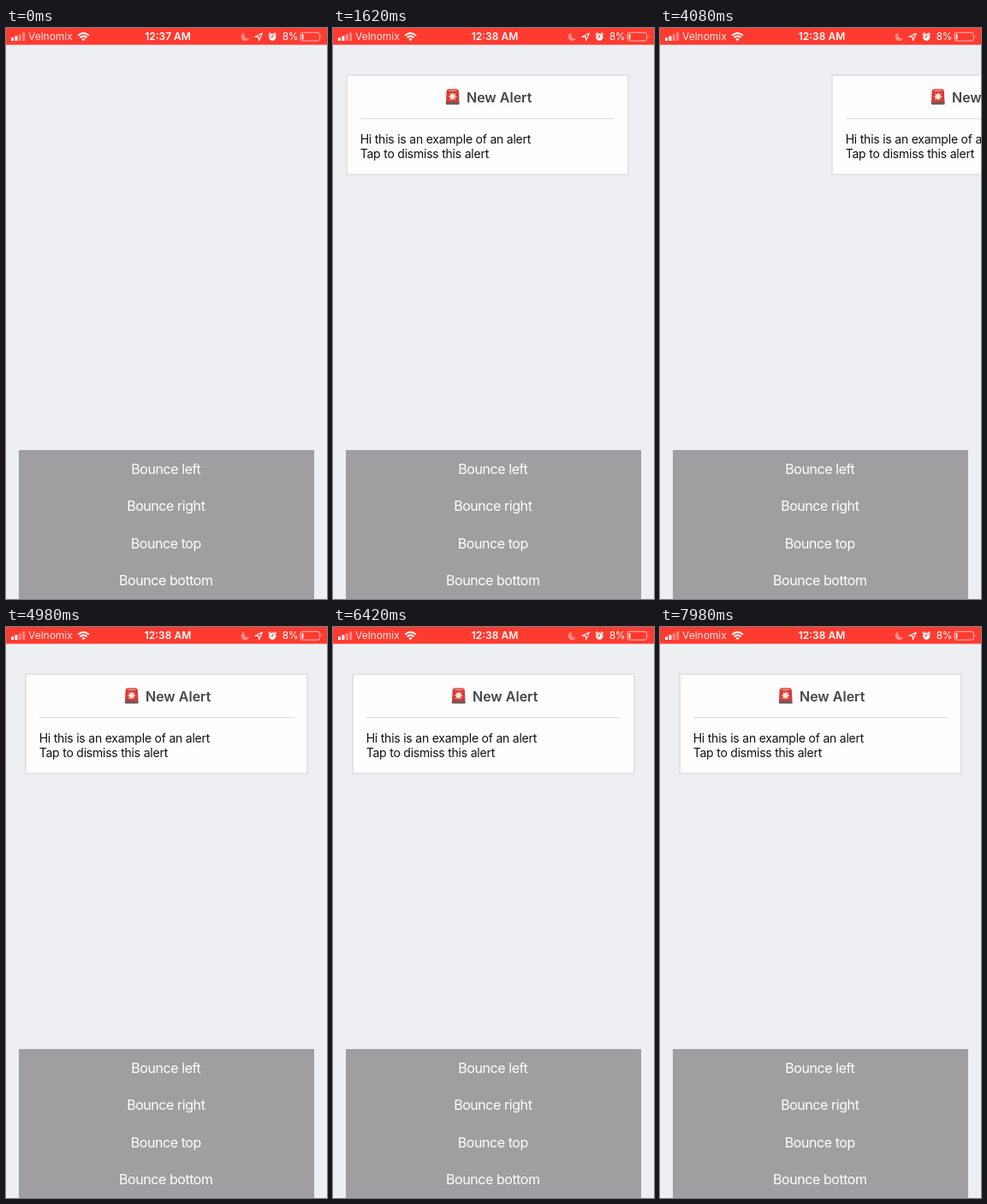
Recreate the animation shown at these times as an HTML page. Size 375 by 667 pixels, loop 8 s.

```html
<!DOCTYPE html>
<html lang="en">
<head>
<meta charset="utf-8">
<title>Bouncing alert</title>
<style>
  html, body { margin: 0; width: 100%; height: 100%; overflow: hidden; background: #edeff3; }
  svg { display: block; width: 100%; height: 100%; }
  text { font-family: Inter, Roboto, sans-serif; }
  .status { font-size: 12px; fill: #fff; }
  .buttons { font-size: 16px; letter-spacing: -.027em; fill: #fff; text-anchor: middle; }
  .title { font-size: 16px; font-weight: 600; fill: #464648; }
  .message { font-size: 14px; letter-spacing: -.016em; fill: #111; }
</style>
</head>
<body>
<svg viewBox="0 0 375 667">
  <rect width="375" height="667" fill="#edeff3"/>

  <rect x="15" y="493" width="345" height="174" fill="#a09ea0"/>
  <g class="buttons">
    <text x="186.8" y="520.5">Bounce left</text>
    <text x="186.8" y="564">Bounce right</text>
    <text x="186.8" y="607.5">Bounce top</text>
    <text x="186.8" y="651">Bounce bottom</text>
  </g>

  <g id="card" visibility="hidden">
    <rect x="23" y="55" width="329" height="116.3" fill="#fefefe" stroke="#e2e3e8" stroke-width="2"/>
    <g id="siren">
      <path d="M139 87 L139.6 74 Q140 71.3 143 71.3 H150.5 Q153.5 71.3 153.9 74 L154.5 87 Z" fill="#d93a34"/>
      <path d="M141.5 74 Q142 72.3 144 72.3 H149.5 Q151.5 72.3 152 74 Z" fill="#ee8a80"/>
      <path d="M146.8 74.5 L147.7 77.6 L150.7 76.2 L149.3 79 L152 80.3 L149 81.2 L150.3 84 L147.5 82.6 L146.4 85 L145.5 82.4 L142.7 83.7 L144.2 81 L141.5 79.8 L144.4 78.9 L143.2 76.2 L145.9 77.5 Z" fill="#ffe3dc"/>
      <rect x="138.8" y="86.3" width="15.9" height="3.2" rx="1.3" fill="#6d5a5e"/>
    </g>
    <text class="title" x="163" y="86.5">New Alert</text>
    <path d="M39 105.7 H336" stroke="#e4e5e9" stroke-width="1.6"/>
    <text class="message" x="38.7" y="135">Hi this is an example of an alert</text>
    <text class="message" x="38.7" y="152">Tap to dismiss this alert</text>
  </g>

  <rect width="375" height="19.6" fill="#ff3b30"/>
  <g class="status">
    <path d="M6 11.2h3v3.8h-3z M10.4 9.3h3v5.7h-3z" fill="#fff"/>
    <path d="M14.8 7.3h3v7.7h-3z M19.2 5.3h3v9.7h-3z" fill="#fff" opacity=".4"/>
    <text x="26" y="14.4" opacity=".88">Velnomix</text>
    <g fill="none" stroke="#fff" stroke-width="1.9">
      <path d="M84.2 8.8 Q90.5 3.2 96.9 8.8"/>
      <path d="M86.5 11.2 Q90.5 7.6 94.6 11.2"/>
    </g>
    <path d="M90.5 15.2 L88.4 12.9 Q90.5 11.2 92.6 12.9 Z" fill="#fff"/>
    <text id="clock" x="189" y="14.4" text-anchor="middle" font-weight="600">12:37 AM</text>
    <path d="M278.6 5.5 A4.9 4.9 0 1 0 284 12.4 A4.9 4.9 0 0 1 278.6 5.5 Z" fill="#fff" opacity=".42"/>
    <path d="M299.3 6.2 L291 10.2 L295.2 10.5 L295.6 14.6 Z" fill="none" stroke="#fff" stroke-width="1.1" stroke-linejoin="round"/>
    <circle cx="311.3" cy="10.6" r="4.2" fill="#fff"/>
    <path d="M307.2 7.3 L308.9 5.8 M313.7 5.8 L315.4 7.3" stroke="#fff" stroke-width="1.2" stroke-linecap="round"/>
    <path d="M311.4 8 V10.8 H309" fill="none" stroke="#ff3b30"/>
    <text x="322.8" y="14.4" letter-spacing="-.03em">8%</text>
    <rect x="344" y="5.3" width="22.4" height="9.8" rx="2.4" fill="none" stroke="#fff" stroke-opacity=".65"/>
    <rect x="345.6" y="6.9" width="1.8" height="6.6" rx=".6" fill="#fff"/>
    <path d="M367.8 8.4 Q369.4 10.2 367.8 12 Z" fill="#fff" opacity=".65"/>
  </g>
</svg>
<script>
  const LOOP = 8000, TRAVEL = 375, CLOCK_TICK = 800;
  const moves = [
    { at: 1302, show: true },
    { at: 3500, show: false },
    { at: 4004, show: true },
    { at: 6760, show: false },
    { at: 7220, show: true }
  ];
  const card = document.getElementById('card');
  const clock = document.getElementById('clock');

  // Distance left to cover by an underdamped spring, 1 at the start, 0 at rest.
  function springLeft(ms) {
    const speed = 19, damping = 0.67, ringing = Math.sqrt(1 - damping ** 2);
    const phase = speed * ms / 1000;
    return Math.exp(-damping * phase) *
      (Math.cos(ringing * phase) + damping / ringing * Math.sin(ringing * phase));
  }

  // Whole pixels keep the card's border crisp.
  function cardOffset(t) {
    const move = moves.filter(m => m.at <= t).pop();
    if (!move) return TRAVEL;
    const left = springLeft(t - move.at);
    return Math.round(TRAVEL * (move.show ? left : 1 - left));
  }

  function draw() {
    const t = performance.now() % LOOP;
    const offset = cardOffset(t);
    card.setAttribute('visibility', offset < 354 ? 'visible' : 'hidden');
    card.setAttribute('transform', `translate(${offset} 0)`);
    clock.textContent = t < CLOCK_TICK ? '12:37 AM' : '12:38 AM';
    requestAnimationFrame(draw);
  }
  draw();
</script>
</body>
</html>
```
